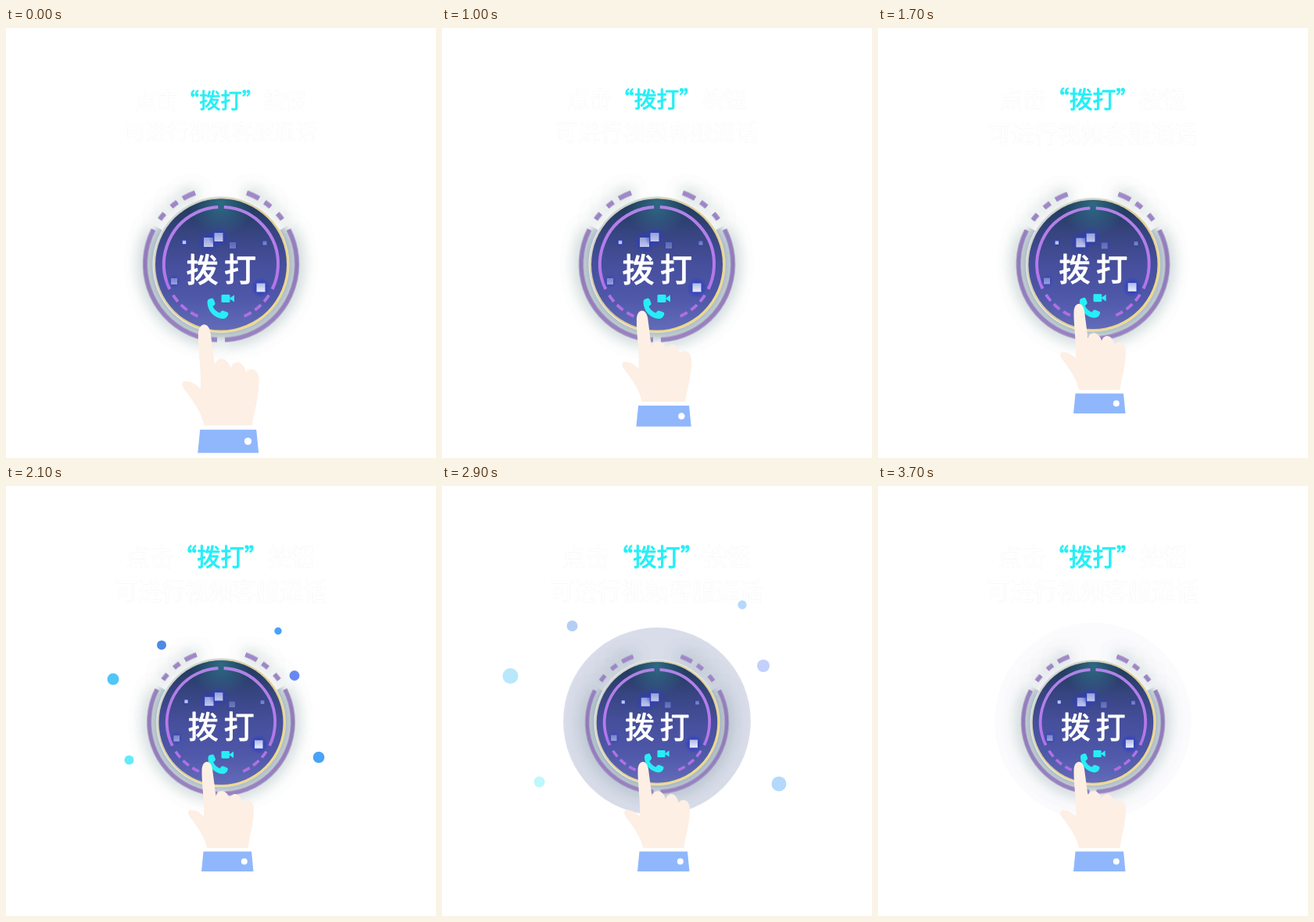
An HTML page with a canvas for the animation above (3800 ms loop, 550 by 550 pixels).

```html
<!DOCTYPE html>
<html lang="zh-CN">
<head>
<meta charset="utf-8">
<title>拨打</title>
<style>
  html, body { margin: 0; width: 100%; height: 100%; overflow: hidden; background: #fff; }
  canvas { display: block; width: 550px; height: 550px; }
</style>
</head>
<body>
<canvas id="stage" lang="zh-CN"></canvas>
<script>
const SIZE = 550, LOOP = 3800, STEP = 100;
const FONT = '"Noto Sans CJK SC", "Noto Sans CJK", sans-serif';
const CYAN = '#27eef6';
const canvas = document.getElementById('stage');
const ctx = canvas.getContext('2d');
const dpr = window.devicePixelRatio || 1;
canvas.width = canvas.height = SIZE * dpr;

const clamp = v => Math.max(0, Math.min(1, v));
const lerp = (a, b, p) => a + (b - a) * p;
const span = (t, from, to) => clamp((t - from) / (to - from));
const easeOut = (p, power) => 1 - Math.pow(1 - p, power);
const rad = deg => deg * Math.PI / 180;

function disc(x, y, r, fill) {
  ctx.beginPath();
  ctx.arc(x, y, r, 0, Math.PI * 2);
  ctx.fillStyle = fill;
  ctx.fill();
}

function arc(r, from, to, width, stroke) {
  ctx.beginPath();
  ctx.arc(0, 0, r, rad(from), rad(to));
  ctx.lineWidth = width;
  ctx.strokeStyle = stroke;
  ctx.stroke();
}

function gradient(x0, y0, x1, y1, ...colors) {
  const g = ctx.createLinearGradient(x0, y0, x1, y1);
  colors.forEach((c, i) => g.addColorStop(i / (colors.length - 1), c));
  return g;
}

function poly(fill, ...points) {
  ctx.beginPath();
  for (const [x, y] of points) ctx.lineTo(x, y);
  ctx.closePath();
  ctx.fillStyle = fill;
  ctx.fill();
}

// Regular glyphs thickened to a medium weight.
function mediumText(ch, x, y, size, color) {
  ctx.fillStyle = ctx.strokeStyle = color;
  ctx.lineWidth = size * 0.032;
  ctx.lineJoin = 'round';
  ctx.fillText(ch, x, y);
  ctx.strokeText(ch, x, y);
}

// Each character sits in its own square cell.
function headline(text, y, size, accent) {
  let x = -text.length * size / 2;
  ctx.textAlign = 'left';
  ctx.font = `400 ${size}px ${FONT}`;
  for (const ch of text) {
    if (accent.includes(ch)) {
      mediumText(ch, x, y, size, CYAN);
    } else {
      ctx.lineWidth = 0.7;
      ctx.strokeStyle = '#f1f2f2';
      ctx.strokeText(ch, x, y);
      ctx.fillStyle = '#fff';
      ctx.fillText(ch, x, y);
    }
    x += size;
  }
}

function drawTitle(t) {
  const s = lerp(0.905, 1, span(t, 0, 2000));
  ctx.save();
  ctx.translate(274.5, 112.5);
  ctx.scale(s, s);
  headline('点击“拨打”按钮', -10.5, 30.2, '“拨打”');
  headline('可进行视频客服通话', 33.5, 30.2, '');
  ctx.restore();
}

function drawRipple(t) {
  if (t < 2500) return;
  const r = lerp(103, 126, easeOut(span(t, 2400, LOOP), 3));
  ctx.globalAlpha = span(t, 2400, 2600) * (1 - span(t, 2500, LOOP));
  disc(275, 301, r, '#c8cfe1');
  ctx.globalAlpha = 1;
}

// x, y, radius early on; x, y, radius later; color
const DOTS = [
  [137, 247, 7.5, 87.5, 243, 10, '#4fc6f8'],
  [199, 203.5, 6, 166.5, 179, 7, '#4c8ae4'],
  [348, 185.5, 4.7, 384, 152, 5.7, '#48a2fa'],
  [369, 242.5, 6.5, 411, 230, 8, '#6a8cf6'],
  [400, 347, 7.3, 431, 381, 9.5, '#4aa3f8'],
  [157.5, 350.5, 6, 124.5, 378.5, 7, '#62ecf8']
];

function drawDots(t) {
  if (t < 1900 || t > 3250) return;
  const flight = time => easeOut(span(time, 1900, 3600), 2);
  const p = (flight(t) - flight(2100)) / (flight(2900) - flight(2100));
  ctx.globalAlpha = span(t, 1800, 2000) * clamp((3250 - t) / 850);
  for (const [x0, y0, r0, x1, y1, r1, color] of DOTS)
    disc(lerp(x0, x1, p), lerp(y0, y1, p), lerp(r0, r1, p), color);
  ctx.globalAlpha = 1;
}

function outerArcs(width, color) {
  arc(97, 93, 207, width, color);
  arc(97, -27, 87, width, color);
  for (const [a, half] of [[25, 5], [38, 2.8], [51, 2.8]])
    for (const side of [-1, 1])
      arc(97, -90 + side * a - half, -90 + side * a + half, width, color);
}

function drawGlow() {
  // The top stays clear of the shade between ring and arcs.
  const g = ctx.createRadialGradient(0, 0, 84, 0, 0, 100);
  g.addColorStop(0, 'rgba(160,175,196,.9)');
  g.addColorStop(0.5, 'rgba(190,203,212,.7)');
  g.addColorStop(1, 'rgba(215,226,228,0)');
  ctx.beginPath();
  ctx.moveTo(0, 0);
  ctx.arc(0, 0, 100, rad(-30), rad(210));
  ctx.fillStyle = g;
  ctx.fill();
  ctx.save();
  ctx.shadowColor = 'rgba(120,148,150,.7)';
  ctx.shadowBlur = 20 * dpr;
  outerArcs(7, 'rgba(178,178,206,.8)');
  outerArcs(6, 'rgba(165,155,200,.8)');
  ctx.restore();
  outerArcs(4.4, gradient(0, -97, 0, 97, '#a487cc', '#917ab8', '#9a82c2'));
}

// x, y, side, opacity
const PIXELS = [
  [-16, -28, 12, 0.75], [-3, -34.5, 11, 0.75], [15, -24, 8, 0.3], [-47, -28, 4.5, 0.85],
  [-60, 22, 8, 0.5], [51, 30, 11, 0.95], [56, -27, 5, 0.4]
];

function drawPixels() {
  for (const [x, y, side, alpha] of PIXELS) {
    const halo = ctx.createRadialGradient(x, y, side * 0.4, x, y, side * 1.2);
    halo.addColorStop(0, 'rgba(42,58,200,.9)');
    halo.addColorStop(1, 'rgba(42,58,200,0)');
    ctx.globalAlpha = alpha;
    disc(x, y, side * 1.2, halo);
    ctx.fillStyle = gradient(0, y - side / 2, 0, y + side / 2, '#b4c1ea', '#f4f6ff');
    ctx.fillRect(x - side / 2, y - side / 2, side, side);
  }
  ctx.globalAlpha = 1;
}

function drawPhone() {
  ctx.fillStyle = CYAN;
  ctx.beginPath();
  ctx.moveTo(-16, 45);
  ctx.lineTo(-11.5, 43.5);
  ctx.quadraticCurveTo(-10, 43.5, -9, 46);
  ctx.lineTo(-7.5, 50);
  ctx.quadraticCurveTo(-7, 52, -10.5, 54);
  ctx.quadraticCurveTo(-8, 60, -1.5, 62.5);
  ctx.quadraticCurveTo(0.5, 59, 2.5, 59.5);
  ctx.lineTo(8, 61.5);
  ctx.quadraticCurveTo(10, 62.5, 9, 65);
  ctx.quadraticCurveTo(7, 70, 2, 70);
  ctx.bezierCurveTo(-9, 69, -17, 60, -17.5, 49);
  ctx.quadraticCurveTo(-17.5, 46, -16, 45);
  ctx.fill();
  ctx.beginPath();
  ctx.roundRect(0.5, 39, 11, 10, 1.5);
  ctx.fill();
  poly(CYAN, [10.5, 44], [17, 39.5], [17, 48.5]);
}

function drawFace() {
  disc(0, 0.5, 87.5, gradient(-70, -50, 70, 50, '#e4eaec', '#f4f2e6', '#ead9a0'));
  disc(0, 0.5, 86.3, gradient(-60, -60, 60, 60, '#cfd4cf', '#dccb92', '#efd988'));
  disc(0, 0.5, 84, gradient(0, -83, 0, 83, '#1d3854', '#36447f', '#464f9c', '#4e57a8', '#626bb8'));
  const teal = ctx.createRadialGradient(0, -78, 0, 0, -78, 42);
  teal.addColorStop(0, 'rgba(52,126,150,.7)');
  teal.addColorStop(1, 'rgba(52,126,150,0)');
  ctx.save();
  ctx.beginPath();
  ctx.arc(0, 0.5, 84, 0, Math.PI * 2);
  ctx.clip();
  ctx.fillStyle = teal;
  ctx.fillRect(-45, -84, 90, 60);
  ctx.restore();

  const violet = gradient(0, -73, 0, 73, '#b083e6', '#b67aec', '#b06ce4');
  arc(73, 154, 267, 4, violet);
  arc(73, -87, 26, 4, violet);
  for (const a of [28, 40.5, 53])
    for (const side of [-1, 1])
      arc(73, 90 + side * a - 4, 90 + side * a + 4, 3.8, violet);
}

function drawButton(t) {
  const s = lerp(1, 0.92, span(t, 1500, 2400));
  ctx.save();
  ctx.translate(275, 302);
  ctx.scale(s, s);
  drawGlow();
  drawFace();
  drawPixels();
  ctx.font = `400 41px ${FONT}`;
  ctx.textAlign = 'center';
  mediumText('拨', -24, 21.5, 41, '#fff');
  mediumText('打', 24.5, 21.5, 41, '#fff');
  drawPhone();
  ctx.restore();
}

function drawHand(t) {
  const p = span(t, 0, 1500), s = lerp(1.171, 1, p);
  ctx.save();
  ctx.translate(lerp(284.5, 283.5, p), lerp(543.5, 493, p));
  ctx.scale(s, s);
  ctx.translate(-283.5, -493);

  ctx.fillStyle = '#fdefe4';
  ctx.beginPath();
  ctx.moveTo(257, 463);
  ctx.bezierCurveTo(254, 449, 247, 440, 241, 431);
  ctx.bezierCurveTo(237, 425, 232, 421, 233, 416.5);
  ctx.bezierCurveTo(236, 412, 247, 416, 253, 423);
  ctx.bezierCurveTo(254, 403, 250, 379, 250.5, 363);
  ctx.bezierCurveTo(251, 350, 262, 349, 264, 362);
  ctx.lineTo(268.5, 397);
  ctx.bezierCurveTo(270, 388, 283, 387, 286, 401);
  ctx.bezierCurveTo(288, 391, 300, 391, 302.5, 405);
  ctx.bezierCurveTo(307, 399, 316, 401, 316.8, 411);
  ctx.bezierCurveTo(317.5, 432, 311.5, 446, 309.5, 463);
  ctx.fill();

  poly('#90b7fc', [252.5, 467.5], [314, 467.5], [316.5, 493], [250, 493]);
  disc(304.8, 480.3, 4, '#fff');
  ctx.restore();
}

function draw(t) {
  ctx.setTransform(dpr, 0, 0, dpr, 0, 0);
  ctx.fillStyle = '#fff';
  ctx.fillRect(0, 0, SIZE, SIZE);
  drawTitle(t);
  drawRipple(t);
  drawDots(t);
  drawButton(t);
  drawHand(t);
}

const start = performance.now();
function tick() {
  const t = (performance.now() - start) % LOOP;
  draw(Math.floor(t / STEP) * STEP);
  requestAnimationFrame(tick);
}
tick();
</script>
</body>
</html>
```
